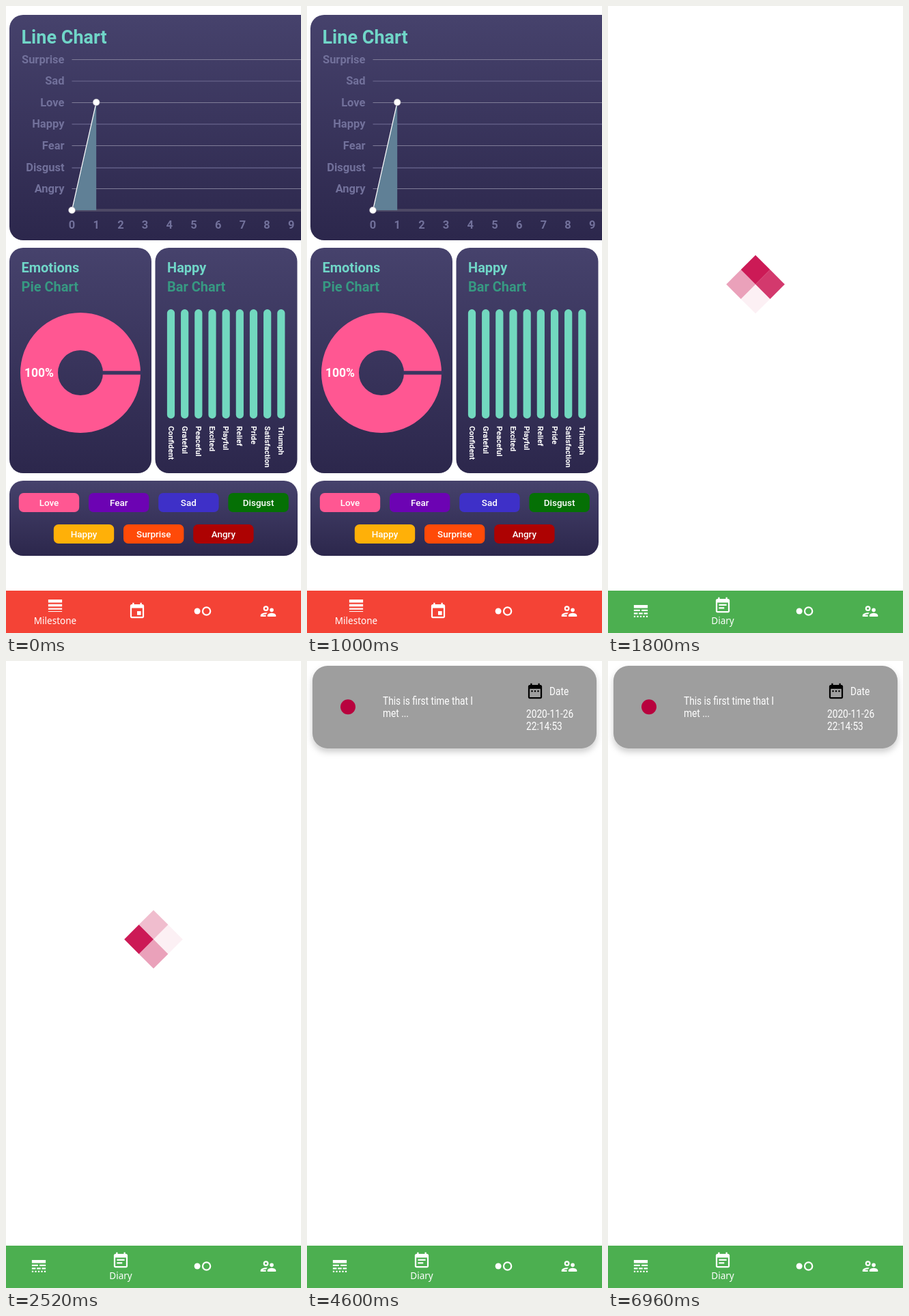
Write an HTML page that moves like this. It is 432 px wide and 918 px high and loops after 7000 ms.

```html
<!DOCTYPE html>
<html lang="en">
<head>
<meta charset="utf-8">
<title>Mood diary</title>
<style>
  html, body { margin: 0; width: 100%; height: 100%; overflow: hidden; background: #fff; }
  svg { display: block; }
  text { font-family: Roboto, sans-serif; white-space: pre; }
  .bold { font-weight: 700; }
  .chip { font-weight: 500; }
  .nav { font-family: "Noto Sans", "Open Sans", sans-serif; }
</style>
</head>
<body>
<svg id="stage" width="432" height="918" viewBox="0 0 432 918">
  <defs>
    <linearGradient id="panel" x2="0" y2="1">
      <stop stop-color="#46426c"/><stop offset="1" stop-color="#2c274c"/>
    </linearGradient>
    <filter id="shadow" x="-10%" y="-20%" width="120%" height="150%">
      <feDropShadow dx="0" dy="5" stdDeviation="5" flood-opacity=".2"/>
    </filter>
    <clipPath id="bar"><rect y="856" width="432" height="62"/></clipPath>
  </defs>
  <g id="charts"></g>
  <g id="loader"></g>
  <g id="entry"></g>
  <g clip-path="url(#bar)">
    <rect y="856" width="432" height="62" fill="#f44336"/>
    <circle id="reveal" cy="887" fill="#4caf50"/>
  </g>
  <g id="nav" fill="#fff"></g>
</svg>
<script>
const LOOP = 7000, TAP = 1480, SHIFT = 200, LOADED = 3240;
const $ = id => document.getElementById(id);
const show = (el, on) => el.setAttribute('visibility', on ? 'visible' : 'hidden');

const text = (x, y, size, str, fill = '#fff', cls = 'bold', more = '') =>
  `<text x="${x}" y="${y}" font-size="${size}" fill="${fill}" class="${cls}" ${more}>${str}</text>`;
const rect = (x, y, w, h, r, fill) =>
  `<rect x="${x}" y="${y}" width="${w}" height="${h}" rx="${r}" fill="${fill}"/>`;
const panel = (x, y, w, h) => rect(x, y, w, h, 20, 'url(#panel)');
const middle = 'text-anchor="middle"';

const MINT = '#70d6c8', GREEN = '#379982', MUTED = '#72719b', PINK = '#ff5792';

function lineChart() {
  const left = 96.5, base = 299, stepX = 35.7, stepY = 31.6;
  const x1 = left + stepX, y1 = base - 5 * stepY;
  let out = panel(5, 13, 460, 330) + text(22.5, 55, 27, 'Line Chart', MINT);
  ['Surprise', 'Sad', 'Love', 'Happy', 'Fear', 'Disgust', 'Angry'].forEach((name, i) => {
    const y = Math.floor(78 + i * stepY), dim = i % 2;
    out += rect(left, y, 340, dim ? 2 : 1, 0, dim ? '#56527a' : '#7f7c97')
         + text(85.5, y + 6, 16.5, name, MUTED, 'bold', 'text-anchor="end"');
  });
  out += rect(left, 297, 340, 4, 0, '#4e4965');
  for (let i = 0; i < 10; i++) out += text(left + i * stepX, 326, 16.5, i, MUTED, 'bold', middle);
  out += `<path d="M${left} ${base}L${x1} ${y1}V${base}z" fill="#608096"/>
    <path d="M${left} ${base}L${x1} ${y1}" stroke="#fff" stroke-width="1.2"/>`;
  for (const [x, y] of [[left, base], [x1, y1]])
    out += `<circle cx="${x}" cy="${y}" r="5" fill="#fff" stroke="#8b8799" stroke-width=".6"/>`;
  return out;
}

function pieChart() {
  return panel(5, 354, 208, 330)
    + text(22.5, 390, 20, 'Emotions', MINT) + text(22.5, 418, 20, 'Pie Chart', GREEN)
    + `<circle cx="109" cy="537" r="60.5" fill="none" stroke="${PINK}" stroke-width="55"/>`
    + rect(140, 534.3, 60, 5.4, 0, '#393560')
    + text(48.5, 543, 17.5, '100%', '#fff', 'bold', middle);
}

function barChart() {
  let out = panel(218.5, 354, 208, 330)
    + text(236, 390, 20, 'Happy', MINT) + text(236, 418, 20, 'Bar Chart', GREEN);
  ['Confident', 'Grateful', 'Peaceful', 'Excited', 'Playful', 'Relief', 'Pride', 'Satisfaction', 'Triumph']
    .forEach((name, i) => {
      const x = 241.5 + i * 20.17;
      out += rect(x - 5.6, 444, 11.2, 160, 5.6, '#72d8bf')
           + text(0, 0, 11.25, name, '#fff', 'bold', `transform="translate(${x - 4} 615) rotate(90)"`);
    });
  return out;
}

function legend() {
  const chip = (x, y, name, fill) =>
    rect(x - 44.2, y - 14, 88.4, 28, 7, fill) + text(x, y + 5, 13.5, name, '#fff', 'chip', middle);
  const row = (x, y, chips) => chips.map(([name, fill], i) => chip(x + i * 102.2, y, name, fill)).join('');
  return panel(5, 695, 422, 110)
    + row(63, 727, [['Love', PINK], ['Fear', '#6c03b3'], ['Sad', '#3e30c8'], ['Disgust', '#057005']])
    + row(114, 773, [['Happy', '#ffb008'], ['Surprise', '#ff4a08'], ['Angry', '#ad0202']]);
}

$('charts').innerHTML = lineChart() + pieChart() + barChart() + legend();

// Loader: four squares of a diamond, in the order their pulse travels
const HALF = 21.4;
$('loader').innerHTML = [[0, -1], [-1, 0], [0, 1], [1, 0]].map(([dx, dy]) =>
  `<path d="M${216 + dx * HALF} ${407.5 + (dy - 1) * HALF}l${HALF} ${HALF}l${-HALF} ${HALF}l${-HALF} ${-HALF}z" fill="#cc1a56"/>`
).join('');
const squares = [...$('loader').children];

// 24-unit icons, drawn at 27 px around a centre
const icon = (x, y, shape) => `<g transform="translate(${x - 13.5} ${y - 13.5}) scale(1.125)">${shape}</g>`;
const path = d => `<path d="${d}"/>`;
const calendar = 'M19 3h-1V1h-2v2H8V1H6v2H5c-1.1 0-2 .9-2 2v14c0 1.1.9 2 2 2h14c1.1 0 2-.9 2-2V5c0-1.1-.9-2-2-2zm0 16H5V8h14z';
const icons = {
  weight: path('M3 4h18v4H3zM3 10h18v3H3zM3 15h18v2H3zM3 19h18v1H3z'),
  style: path('M3 4h18v4H3zM3 10h8v2H3zM13 10h8v2h-8zM3 14h5v2H3zM9.5 14h5v2h-5zM16 14h5v2h-5z'
    + [3, 7, 11, 15, 19].map(x => `M${x} 18h2v2h-2z`).join('')),
  event: path(calendar + 'M12 12h5v5h-5z'),
  note: path(calendar + 'M7 10h10v2H7zM7 14h7v2H7z'),
  range: `<g transform="translate(0 1)">${path(calendar + 'M7 10h2v2H7zM11 10h2v2h-2zM15 10h2v2h-2z')}</g>`,
  dots: '<circle cx="5" cy="12" r="4"/><circle cx="17" cy="12" r="5" fill="none" stroke="#fff" stroke-width="2"/>',
  people: '<circle cx="9" cy="8.5" r="2.5" fill="none" stroke="#fff" stroke-width="2"/><circle cx="16.5" cy="10.5" r="2.5"/>'
    + path('M11 19v-1.5c0-2 3.7-3 5.5-3s5.5 1 5.5 3V19z')
    + path('M9 19H2v-1.5C2 15.2 6.7 14 9 14c.6 0 1.3.1 2 .2-.7.5-1.3 1.1-1.6 1.8-1.6-.1-3.6.4-4.6 1H9z')
};

// The card uses a condensed face
const narrow = (x, y, str) =>
  text(0, 0, 15.75, str, '#fff', '', `transform="translate(${x} ${y}) scale(.87 1)"`);
$('entry').innerHTML =
  `<g filter="url(#shadow)">${rect(8, 7, 416, 121, 22, '#9e9e9e')}</g>
   <circle cx="60" cy="67.3" r="11" fill="#b8023e"/>`
  + icon(334, 44, icons.range)
  + narrow(111, 64, 'This is first time that I') + narrow(111, 82, 'met ...')
  + narrow(355, 50, 'Date') + narrow(321, 83, '2020-11-26') + narrow(321, 101, '22:14:53');

function drawNav(p) {
  const x0 = 72 - 24 * p, x1 = 192 - 24 * p, on = p > 0;
  const label = (x, str, alpha) => text(x, 905, 13.5, str, '#fff', 'nav', `${middle} opacity="${alpha}"`);
  $('nav').innerHTML =
    icon(x0, 878 + 8 * p, on ? icons.style : icons.weight) + label(x0, 'Milestone', 1 - p)
    + icon(x1, 886 - 8 * p, on ? icons.note : icons.event) + label(x1, 'Diary', p)
    + icon(288, 886, icons.dots) + icon(384, 886, icons.people);
  $('reveal').setAttribute('cx', x1);
  $('reveal').setAttribute('r', 272 * p);
}

let lastShift = -1;
function frame() {
  const t = performance.now() % LOOP;
  show($('charts'), t < TAP);
  show($('loader'), t >= TAP && t < LOADED);
  show($('entry'), t >= LOADED);

  squares.forEach((square, i) => {
    const turn = (t - 2472) / 2400 - 0.3 * (i - 1);
    square.setAttribute('opacity', 0.5 + 0.5 * Math.cos(2 * Math.PI * turn));
  });

  const u = Math.min(1, Math.max(0, (t - TAP) / SHIFT));
  const p = u * u * (3 - 2 * u);
  if (p !== lastShift) drawNav(lastShift = p);
  requestAnimationFrame(frame);
}
frame();
</script>
</body>
</html>
```
